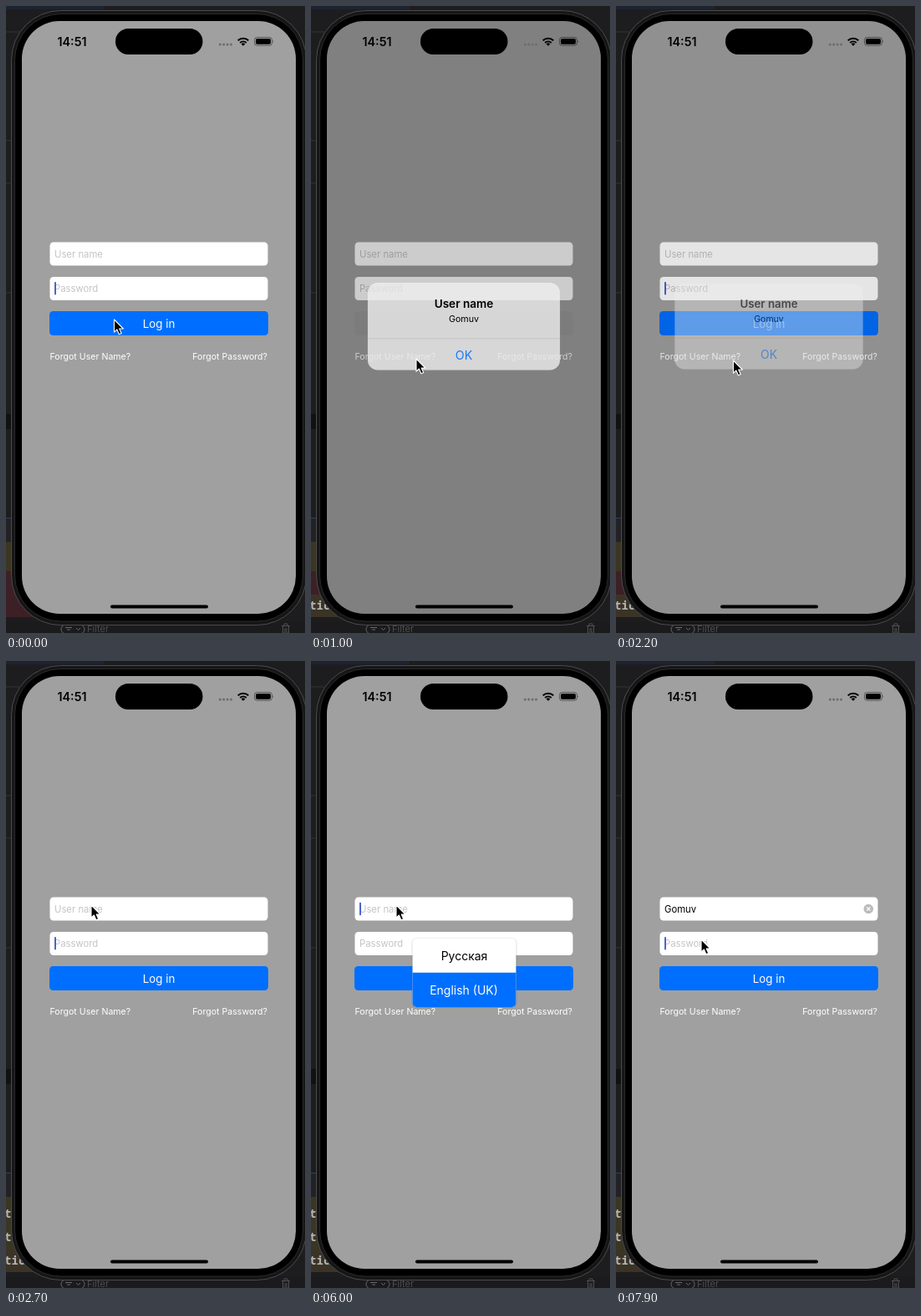
Animation of 358 by 750 pixels, one loop 8 s. Source, as an HTML page:

```html
<!DOCTYPE html>
<html lang="en">
<head>
<meta charset="utf-8">
<title>Log in</title>
<style>
  html, body { margin: 0; width: 100%; height: 100%; overflow: hidden; background: #1c1c1e; }
  svg { display: block; width: 100vw; height: 100vh; }
  text { font-family: Inter, Roboto, sans-serif; white-space: pre; }
  .mid { text-anchor: middle; }
  .hint { font-size: 11.3px; fill: #c4c4c6; }
  .link { font-size: 10.6px; fill: #fff; }
  .code { font: bold 14px "Noto Sans Mono", monospace; fill: #b4b4b4; }
</style>
</head>
<body>
<svg viewBox="0 0 358 750" preserveAspectRatio="none">
  <!-- desktop behind the phone -->
  <rect width="358" height="750" fill="#1d1d1f"/>
  <rect width="118" height="4" fill="#1d2430"/>
  <path d="M0 31H16M0 161H8M0 212H8M0 343H8" stroke="#323234"/>
  <rect y="488" width="8" height="18" fill="#111113"/>
  <rect y="612" width="12" height="1" fill="#30405e"/>
  <rect y="613" width="20" height="28" fill="#222226"/>
  <rect y="641" width="30" height="64" fill="#3a3621"/>
  <rect id="errorBand" y="676" width="40" height="55" fill="#3d2025"/>
  <rect id="logBand" y="704" width="40" height="27" fill="#3b3426"/>
  <g id="logTop"><text class="code" x="-2" y="666">t</text><text class="code" x="-2" y="694">t</text></g>
  <text id="logLast" class="code" x="-2" y="722">tic</text>
  <rect y="736" width="358" height="14" fill="#1b1b1d"/>
  <g fill="none" stroke="#69696c">
    <rect x="66" y="740" width="28" height="11" rx="5.5"/>
    <path d="M71 743.5h8M73 746h4M84 744l2.5 2.5 2.5-2.5"/>
    <path d="M330 741.5h10M333 741v-2h4v2M331.5 742v8h7v-8M334 744v5M336 744v5" stroke="#505053"/>
  </g>
  <text x="97" y="749" font-size="11" fill="#4d4d50">Filter</text>

  <!-- phone -->
  <rect x="6.5" y="5.5" width="353" height="735" rx="59" fill="#161617" stroke="#4b4b4d"/>
  <rect x="10.5" y="9.5" width="345" height="726.5" rx="55" stroke="#2a2a2c"/>
  <clipPath id="screen"><rect x="19" y="18" width="328" height="709" rx="45"/></clipPath>
  <g clip-path="url(#screen)">
    <rect x="19" y="18" width="328" height="709" fill="#a0a0a0"/>
    <rect x="52.5" y="282.5" width="261" height="28" rx="4.5" fill="#fff"/>
    <rect x="52.5" y="324" width="261" height="28" rx="4.5" fill="#fff"/>
    <rect id="button" x="52" y="365" width="262" height="29" rx="4.5"/>
    <text id="buttonText" class="mid" x="183" y="385" font-size="13.4" fill="#fff">Log in</text>
    <text id="userHint" class="hint" x="58" y="300.7">User name</text>
    <text id="userText" x="58" y="300.7" font-size="11.3"></text>
    <text class="hint" x="58" y="342.3">Password</text>
    <g id="clear">
      <circle cx="302.3" cy="296.5" r="5.8" fill="#bcbcbe"/>
      <path d="M300.2 294.4l4.2 4.2M304.4 294.4l-4.2 4.2" stroke="#fff" stroke-width="1.2"/>
    </g>
    <rect id="caret" width="1.8" height="15.5" rx=".8" fill="#3a55d0"/>
    <text class="link" x="52.5" y="423">Forgot User Name?</text>
    <text class="link" x="313" y="423" text-anchor="end">Forgot Password?</text>
    <rect id="dim" x="19" y="18" width="328" height="709"/>
  </g>

  <!-- status bar and home indicator -->
  <text class="mid" x="79" y="47.5" font-size="14.3" font-weight="600">14:51</text>
  <rect x="131" y="27" width="104.5" height="31" rx="15.5"/>
  <path d="M256.3 46h13.5" stroke="#6d6d6d" stroke-width="3" stroke-linecap="round" stroke-dasharray="0 4.4"/>
  <path d="M277.7 41.2a9 9 0 0 1 12.6 0M280.2 44a5.5 5.5 0 0 1 7.6 0" fill="none" stroke="#000" stroke-width="2"/>
  <path d="M284 47.8l-2.3-2.4a3.3 3.3 0 0 1 4.6 0z"/>
  <rect x="297.5" y="37.5" width="21" height="9.7" rx="3" fill="none" stroke="#000" stroke-opacity=".45"/>
  <rect x="299" y="39" width="18" height="6.7" rx="1.8"/>
  <path d="M319.6 41q1.8 1.4 0 2.8z" opacity=".5"/>
  <rect x="125" y="716.5" width="117" height="4" rx="2"/>

  <g id="alert">
    <rect x="70.3" y="332" width="225.4" height="102.5" rx="11.7" fill="#f0f0f0" fill-opacity=".78"/>
    <path d="M70.3 397.5h225.4" stroke="#000" stroke-opacity=".14" stroke-width=".7"/>
    <text class="mid" x="183" y="361" font-size="13.3" font-weight="600">User name</text>
    <text id="alertName" class="mid" x="183" y="377.8" font-size="10.5"></text>
    <text class="mid" x="183" y="422" font-size="13.9" fill="#147aff">OK</text>
  </g>

  <g id="languages">
    <rect x="120.5" y="331" width="126" height="84" rx="6" opacity=".12"/>
    <rect x="121.5" y="331.5" width="124" height="82.5" rx="5" fill="#fff"/>
    <path d="M121.5 372.7h124v36.3a5 5 0 0 1-5 5h-114a5 5 0 0 1-5-5z" fill="#006fff"/>
    <text class="mid" x="183.5" y="357.5" font-size="14">Русская</text>
    <text class="mid" x="183" y="399" font-size="14" fill="#fff">English (UK)</text>
  </g>

  <path id="pointer" d="M0 0V15.2L3.4 12L5.9 17.7L8.7 16.5L6.2 11H10.9Z" stroke="#fff" stroke-width="1.1" stroke-linejoin="round"/>
</svg>
<script>
const LOOP = 8000, STEP = 100, NAME = 'Gomuv';
const el = {};
document.querySelectorAll('[id]').forEach(node => el[node.id] = node);
el.alertName.textContent = NAME;

const clamp = (v, min, max) => Math.min(max, Math.max(min, v));
// Smooth rise from 0 to 1
function ramp(t, from, to) {
  const p = clamp((t - from) / (to - from), 0, 1);
  return p * p * (3 - 2 * p);
}
// Fades in from start, out from end
const pulse = (t, start, end, fade) => ramp(t, start, start + fade) - ramp(t, end, end + fade);
// Number of key presses so far in an even run
const keys = (t, start, count, gap = 1) => clamp(Math.floor((t - start) / gap) + 1, 0, count);
const set = (node, attributes) => {
  for (const name in attributes) node.setAttribute(name, attributes[name]);
};
const show = (node, amount) => set(node, { opacity: Number(amount) });

function drawLogin(t, presence) {
  const letters = keys(t, 3700, 1) - keys(t, 4200, 1)
    + keys(t, 4400, 3, 200) - keys(t, 5400, 3, 150)
    + keys(t, 6600, 1) + keys(t, 7100, 4, 130);
  const inUser = t >= 3000 && t < 7900;

  el.userText.textContent = NAME.slice(0, letters);
  show(el.userHint, letters === 0);
  const textWidth = inUser && letters ? el.userText.getComputedTextLength() : 0;
  set(el.caret, { x: 58.1 + textWidth, y: inUser ? 288.7 : 330 });
  show(el.caret, 1 - pulse(t, 0, 300, 200) - pulse(t, 700, 1900, 100) - pulse(t, 3200, 3500, 200));
  show(el.clear, pulse(t, 3700, 4200, 200) + pulse(t, 4400, 5600, 200) + ramp(t, 6500, 6700));

  const muted = t >= 800 && t < 2000;
  set(el.button, { fill: muted ? '#9b9b9b' : '#006fff' });
  show(el.buttonText, 1 - presence);
}

function drawOverlays(t, presence) {
  show(el.dim, .2 * presence);
  show(el.alert, presence);
  const scale = 1 + .06 * (1 - ramp(t, 700, 1200));
  set(el.alert, { transform: `translate(183 383.3) scale(${scale}) translate(-183 -383.3)` });
  show(el.languages, pulse(t, 5900, 6300, 100));
}

function drawDesktop(t) {
  show(el.logLast, t >= 900);
  show(el.logBand, t >= 900);
  show(el.logTop, t >= 2400);
  show(el.errorBand, t < 2400);
}

function drawPointer(t) {
  const toOk = ramp(t, 300, 500), nudge = ramp(t, 1400, 1700);
  const toUser = ramp(t, 2200, 2600), toPassword = ramp(t, 7500, 7800);
  const x = 129.5 - 3.5 * toOk + 14.5 * nudge - 38.5 * toUser;
  const y = 375 + 47 * toOk + 2 * nudge - 132 * toUser + 41 * toPassword;
  set(el.pointer, { transform: `translate(${x} ${y})` });
}

function draw(t) {
  const presence = ramp(t, 700, 1000) - ramp(t, 2000, 2400);
  drawLogin(t, presence);
  drawOverlays(t, presence);
  drawDesktop(t);
  drawPointer(t);
}

const start = performance.now();
function frame() {
  const t = (performance.now() - start) % LOOP;
  draw(Math.floor(t / STEP) * STEP);
  requestAnimationFrame(frame);
}
frame();
</script>
</body>
</html>
```
